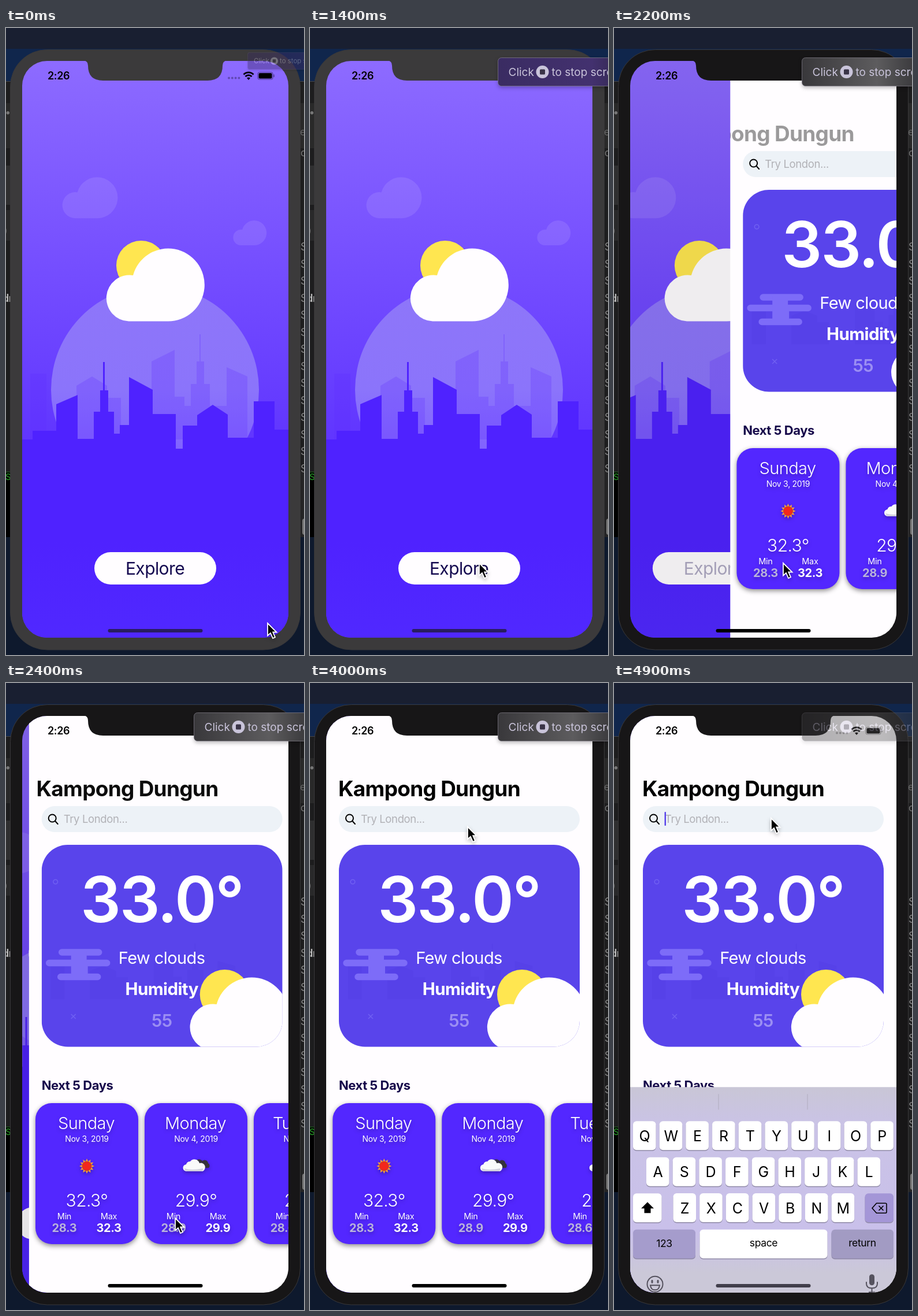
An HTML page that plays this animation: 516 px wide and 1085 px high, repeating every 5000 ms.

```html
<!DOCTYPE html>
<html lang="en">
<head>
<meta charset="utf-8">
<title>Weather app</title>
<style>
html, body { margin: 0; width: 100%; height: 100%; overflow: hidden; background: #111; }
svg { display: block; width: 100%; height: 100%; }
text { font-family: Inter, Roboto, sans-serif; letter-spacing: -.02em; white-space: pre; }
.mid { text-anchor: middle; }
.card { filter: drop-shadow(0 3px 4px rgba(0,0,0,.45)); }
.soft { filter: drop-shadow(0 3px 3px rgba(0,0,0,.25)); }
</style>
</head>
<body>
<svg viewBox="0 0 516 1085" preserveAspectRatio="none">
  <defs>
    <linearGradient id="sky" gradientUnits="userSpaceOnUse" x1="0" y1="57" x2="0" y2="720">
      <stop stop-color="#8d6bff"/><stop offset="1" stop-color="#6035ff"/>
    </linearGradient>
    <linearGradient id="moon" x1="0" y1="0" x2="0" y2="1">
      <stop stop-color="#8e76f9"/><stop offset=".5" stop-color="#8b74fb"/><stop offset=".8" stop-color="#8062ff"/>
    </linearGradient>
    <linearGradient id="ground" x1="0" y1="0" x2="0" y2="1">
      <stop stop-color="#4f22ff"/><stop offset=".65" stop-color="#4f22ff"/><stop offset="1" stop-color="#5028ff"/>
    </linearGradient>
    <linearGradient id="board" x1="0" y1="0" x2="0" y2="1">
      <stop stop-color="#c9c6d6"/><stop offset=".18" stop-color="#cac3e6"/>
      <stop offset=".7" stop-color="#c9c0ea"/><stop offset=".9" stop-color="#cbc8d8"/>
    </linearGradient>
    <linearGradient id="glassViolet">
      <stop stop-color="#3a2c62"/><stop offset=".35" stop-color="#43316f"/><stop offset=".5" stop-color="#2c2544"/>
    </linearGradient>
    <linearGradient id="glassGrey">
      <stop stop-color="#39383b"/><stop offset=".28" stop-color="#5d5c5e"/><stop offset=".48" stop-color="#2b2b2e"/>
    </linearGradient>
    <clipPath id="screen"><rect x="28" y="57" width="461" height="998" rx="43"/></clipPath>
    <clipPath id="page"><rect x="28" y="57" width="461" height="998"/></clipPath>
    <clipPath id="mainCard"><rect x="50" y="280" width="417" height="349.5" rx="45"/></clipPath>
    <path id="cloud" d="M212.500 507.500A40 40 0 1 1 220 428A63 63 0 1 1 280 507.500Z"/>
    <g id="sunCloud">
      <circle cx="234" cy="411" r="43" fill="#ffe650"/>
      <use href="#cloud" fill="#fffdff"/>
    </g>
    <g id="farCity">
      <path d="M42 712V598H70V712ZM122 712V619L149 603L175 619V640H199V712ZM252 712V577L292 557V638H309V654H320V616H330V577H335V530H337V577H343V616H353V654H382V587L418 603V712Z"/>
    </g>
    <g id="sunIcon"></g>
    <g id="cloudIcon">
      <path d="M-1 -2a7 7 0 0 1 12 -7a6 6 0 0 1 10 4a5 5 0 0 1 1 8H4Z" fill="#35323c"/>
      <path d="M-16 9a6 6 0 0 1 -1 -12a7 7 0 0 1 7 -5a9 9 0 0 1 16 3a7 7 0 0 1 5 14Z" fill="#fafafa"/>
      <path d="M-16 9a6 6 0 0 1 -4 -5q12 4 32 0a5 5 0 0 1 -2 5Z" fill="#d3d2dc"/>
    </g>
  </defs>

  <g id="desktop"></g>

  <rect id="bezel" x="7.500" y="37.500" width="502" height="1038.500" rx="64" stroke="#39383a"/>

  <g clip-path="url(#screen)">
    <g id="welcome">
      <rect x="28" y="57" width="461" height="998" fill="url(#sky)"/>
      <g fill="#fff" fill-opacity=".1">
        <use href="#cloud" transform="translate(-.500 43) scale(.564)"/>
        <use href="#cloud" transform="translate(334 203) scale(.341)"/>
      </g>
      <circle cx="258" cy="626" r="180" fill="url(#moon)"/>
      <use href="#farCity" fill="#5c2cff" fill-opacity=".24"/>
      <path fill="url(#ground)" d="M28 712H46V697H87V651L124 635V711H152V664H163V627H168V578H171V627H177V664H187V702H197V687H213V604L254 626V668H294V728H306V688H331V670L358 652L384 669V709H429V646H465V695H489V1056H28Z"/>
      <use href="#sunCloud"/>
      <rect x="153" y="907" width="211" height="56" rx="28" fill="#fffdff"/>
      <text id="explore" class="mid" x="258" y="946" font-size="30" fill="#150a50">Explore</text>
    </g>
    <rect id="dim" x="28" y="57" width="461" height="998"/>

    <g id="forecast" clip-path="url(#page)">
      <rect x="28" y="57" width="461" height="998" fill="#fffdff"/>
      <text id="place" x="49" y="196" font-size="37" font-weight="700">Kampong Dungun</text>
      <rect x="50" y="213" width="417" height="45" rx="22.500" fill="#edf2f7"/>
      <g fill="none" stroke="#000" stroke-width="2" stroke-linecap="round">
        <circle cx="68.500" cy="234" r="6.500"/><path d="M73.500 239L78 244"/>
      </g>
      <text x="88" y="242" font-size="18.500" fill="#b1b1b6">Try London...</text>
      <rect id="caret" x="87.500" y="223" width="2.500" height="24" rx="1" fill="#5944eb"/>

      <g clip-path="url(#mainCard)">
        <rect x="50" y="280" width="417" height="350" fill="#5944eb"/>
        <use href="#farCity" transform="translate(30 170) scale(.85 .53)" fill="#3c28c8" fill-opacity=".1"/>
        <g stroke="#7d6cf8" stroke-width="11.500" stroke-linecap="round">
          <path d="M85 466H149M63 484.500H163M83 508.500H147"/>
          <path d="M101 473H128M101 496H130" stroke-linecap="butt" stroke-width="18"/>
        </g>
        <g fill="none" stroke="#7060f2" stroke-width="1.500">
          <circle cx="74" cy="344" r="3.800"/><path d="M101 573l8 8m0 -8l-8 8"/>
        </g>
        <g class="mid" fill="#fff">
          <text x="258" y="414" font-size="110" font-weight="600">33.0°</text>
          <text x="258" y="486" font-size="29">Few clouds</text>
          <text x="258" y="540" font-size="29.500" font-weight="700">Humidity</text>
          <text x="258" y="595" font-size="30" font-weight="600" fill-opacity=".4">55</text>
        </g>
        <use href="#sunCloud" transform="translate(133 128)"/>
      </g>

      <text x="50" y="704" font-size="22" font-weight="700" fill="#16084a">Next 5 Days</text>
      <g id="days"></g>
    </g>

    <g id="keyboard"></g>
    <rect id="homeBar" x="176.500" y="1040" width="164" height="6" rx="3"/>
  </g>

  <g id="status">
    <path id="notch" d="M134 56Q142 57 142 65Q142 91 168 91H349Q375 91 375 65Q375 57 383 56Z"/>
    <text x="72" y="89" font-size="18" font-weight="600">2:26</text>
    <path d="M386 86.500h18" stroke="#000" stroke-opacity=".3" stroke-width="4" stroke-linecap="round" stroke-dasharray="0 5.800"/>
    <g fill="none" stroke="#000" stroke-width="2.800">
      <path d="M411.500 80.500a12 12 0 0 1 17 0M414.500 84a7.500 7.500 0 0 1 11 0"/>
      <path d="M417 86.500L420 90L423 86.500Q420 84.500 417 86.500Z" fill="#000" stroke="none"/>
      <rect x="436" y="76.500" width="26" height="12.500" rx="3.500" stroke-opacity=".4" stroke-width="1.200"/>
      <rect x="437.500" y="78" width="23" height="9.500" rx="2" fill="#000" stroke="none"/>
      <path d="M464 80.500v4.500" stroke-opacity=".4" stroke-width="1.500"/>
    </g>
  </g>

  <g id="tip">
    <g class="soft">
      <rect id="glass" x="-232" y="-24.500" width="464" height="49" rx="6" stroke="#86828e" stroke-opacity=".7"/>
    </g>
    <g fill="#c9c4da">
      <text x="-214" y="6.500" font-size="19" style="letter-spacing:0">Click</text>
      <circle cx="-155" cy="0" r="11"/>
      <rect x="-159.500" y="-4.500" width="9" height="9" rx="1.500" fill="#3a3448"/>
      <text x="-139" y="6.500" font-size="19" style="letter-spacing:0">to stop screen recording</text>
    </g>
  </g>

  <path id="cursor" class="soft" d="M0 0V21.500L5 17L9 26L13 24.300L9.200 15.500H15.500Z" stroke="#fff" stroke-width="1.800"/>
</svg>

<script>
const LOOP = 5000;
const byId = id => document.getElementById(id);
const set = (id, attrs) => {
  for (const name in attrs) byId(id).setAttribute(name, attrs[name]);
};
const rect = (x, y, w, h, fill, rx = 0) =>
  `<rect x="${x}" y="${y}" width="${w}" height="${h}" rx="${rx}" fill="${fill}"/>`;
const label = (x, y, size, words, fill, weight = 400, anchor = 'middle') =>
  `<text x="${x}" y="${y}" font-size="${size}" fill="${fill}" font-weight="${weight}" text-anchor="${anchor}">${words}</text>`;

function buildDesktop() {
  let art = rect(0, 0, 516, 36, '#191f31') + rect(0, 36, 516, 57, '#10264c') +
    rect(0, 93, 516, 676, '#1d1d1e') + rect(0, 130, 516, 78, '#292929') +
    rect(0, 238, 7, 68, '#2f2f30') + rect(0, 315, 7, 53, '#29292a') +
    rect(0, 768, 7, 113, '#000') + rect(0, 768, 7, 1, '#1d6b1d') +
    rect(509, 768, 7, 113, '#242425') + rect(513, 849, 8, 28, '#777', 4) +
    rect(0, 881, 516, 204, '#0e192d') + rect(0, 92, 516, 1, '#454548');
  art += label(-6, 474, 18, 'dr', '#bbb', 600, 'start') + label(-3, 356, 15, ')', '#777', 400, 'start') +
    label(-1, 782, 15, 'S', '#28a428', 400, 'start') + label(3, 152, 18, '•', '#777') +
    label(509, 186, 17, 'ea', '#666', 400, 'start') + label(510, 222, 17, 'c', '#777', 400, 'start');
  for (let i = 0; i < 14; i++) art += label(510, 385 + i * 29.5, 18, 'S', '#858585', 400, 'start');
  byId('desktop').innerHTML = art;
}

function buildSunIcon() {
  const spikes = Array.from({ length: 24 }, (_, i) => {
    const r = i % 2 ? 8.5 : 13, a = i * Math.PI / 12;
    return `${(r * Math.cos(a)).toFixed(1)},${(r * Math.sin(a)).toFixed(1)}`;
  });
  byId('sunIcon').innerHTML = `<polygon points="${spikes.join(' ')}" fill="#f5a13a"/>
    <circle r="8" fill="#f3271c" stroke="#b5442c"/>`;
}

function buildDays() {
  const days = [
    ['Sunday', 3, 'sunIcon', '32.3', '28.3'],
    ['Monday', 4, 'cloudIcon', '29.9', '28.9'],
    ['Tuesday', 5, 'cloudIcon', '28.8', '28.6']
  ];
  byId('days').innerHTML = days.map(([day, date, icon, high, low], i) => `
    <g transform="translate(${128.3 + i * 189} 0)">
      <g class="card">${rect(-89, 727, 178, 244, '#5327ff', 28)}</g>
      <g class="soft">
        ${label(-1, 772, 29, day, '#fff', 300)}
        ${label(0, 794, 14, `Nov ${date}, 2019`, '#fff')}
        <use href="#${icon}" transform="translate(0 836)"/>
        ${label(0, 906, 30, high + '°', '#fff', 300)}
        ${label(-39, 928, 14.5, 'Min', '#fff')}${label(38, 928, 14.5, 'Max', '#fff')}
        ${label(-39, 950, 20, low, '#b9b3dc', 700)}${label(38, 950, 20, high, '#fff', 700)}
      </g>
    </g>`).join('');
}

function buildKeyboard() {
  const key = (x, y, w, fill = '#fff') =>
    rect(x, y + 1.5, w, 50, '#8f89a6', 6) + rect(x, y, w, 50, fill, 6);
  let art = rect(28, 699, 461, 357, 'url(#board)') +
    rect(180.5, 711, 1, 27, '#b0acbd') + rect(334.5, 711, 1, 27, '#b0acbd');
  [['QWERTYUIOP', 33], ['ASDFGHJKL', 56], ['ZXCVBNM', 102.5]].forEach(([letters, left], row) => {
    [...letters].forEach((letter, i) => {
      const x = left + i * 45.7, y = 758 + row * 62.4;
      art += key(x, y, 39.5) + label(x + 19.75, y + 34.5, 25, letter, '#000');
    });
  });
  art += key(33, 883, 49.5) + key(434.5, 883, 49.5, '#a496d7') + key(33, 945.5, 108, '#a59ccc') +
    key(148.5, 945.5, 221, '#fff') + key(376.5, 945.5, 107.5, '#a29bc3') +
    label(87, 976, 17.5, '123', '#000') + label(259, 975, 17.5, 'space', '#000') +
    label(430, 975, 17.5, 'return', '#000') + `
    <path d="M58 898L69 909H63.500V917H52.500V909H47Z"/>
    <g fill="none" stroke="#000" stroke-width="1.600">
      <path d="M447 908.500L454.500 900H470Q472 900 472 902V915Q472 917 470 917H454.500ZM458.500 904.500l8 8m0 -8l-8 8"/>
    </g>
    <g fill="none" stroke="#55525e" stroke-width="2">
      <circle cx="71" cy="1040" r="13.500"/>
      <path d="M63 1042H79Q78 1050 71 1050Q64 1050 63 1042ZM437 1036V1039Q437 1047 446.500 1047T456 1039V1036M446.500 1047V1054M441 1054H452"/>
      <path d="M66 1034v3m10 -3v3" stroke-width="3" stroke-linecap="round"/>
      <rect x="442" y="1023" width="9" height="19" rx="4.500" fill="#55525e" stroke="none"/>
    </g>`;
  byId('keyboard').innerHTML = art;
}

const clamp = v => Math.max(0, Math.min(1, v));
const ramp = (t, from, to) => clamp((t - from) / (to - from));
const smooth = v => v * v * (3 - 2 * v);
// Remaining distance (1 to 0) of a critically damped spring.
const spring = (t, start, rate) => {
  const s = Math.max(0, t - start) * rate / 1000;
  return s > 12 ? 0 : (1 + s) * Math.exp(-s);
};

const cursorStops = [
  [250, 453, 1030], [1300, 293, 926], [2450, 293, 926], [3100, 240, 424],
  [3500, 240, 424], [3980, 273, 249], [4250, 272, 234]
];
function cursorAt(t) {
  let [, x, y] = cursorStops[0];
  for (let i = 1; i < cursorStops.length; i++) {
    const [from] = cursorStops[i - 1], [to, nextX, nextY] = cursorStops[i];
    const k = smooth(ramp(t, from, to));
    x += (nextX - x) * k;
    y += (nextY - y) * k;
  }
  return [x, y];
}

function draw(t) {
  const frame = t < 1700 ? '#3b3a3b' : '#171617';
  set('bezel', { fill: frame });
  set('notch', { fill: frame });

  const away = spring(t, 2078, 17.2), shown = 1 - away;
  set('welcome', { transform: `translate(${-138 * shown} 0)` });
  set('dim', { 'fill-opacity': 0.1 * shown });
  set('forecast', { transform: `translate(${461 * away} 0)` });
  set('place', { transform: `translate(${-323 * away} 0)`, opacity: shown * shown });
  set('explore', { opacity: 1 - 0.66 * ramp(t, 1900, 2000) });

  const lowered = spring(t, 4350, 17.2);
  set('keyboard', { transform: `translate(0 ${357 * lowered})` });
  set('caret', { opacity: t > 4350 ? 1 : 0 });
  set('homeBar', { fill: t > 4450 ? '#413e4b' : shown > 0.5 ? '#000' : '#291d62' });

  const grow = 0.6 + 0.4 * smooth(ramp(t, 0, 450));
  set('tip', {
    transform: `translate(557.5 ${28.5 + 47.5 * grow}) scale(${grow})`,
    opacity: 0.4 + 0.6 * ramp(t, 0, 300) - 0.6 * ramp(t, 4650, 4900)
  });
  set('glass', { fill: shown > 0.5 ? 'url(#glassGrey)' : 'url(#glassViolet)' });
  set('cursor', { transform: `translate(${cursorAt(t)})` });
}

buildDesktop();
buildSunIcon();
buildDays();
buildKeyboard();

const began = performance.now();
function tick() {
  draw((performance.now() - began) % LOOP);
  requestAnimationFrame(tick);
}
tick();
</script>
</body>
</html>
```
